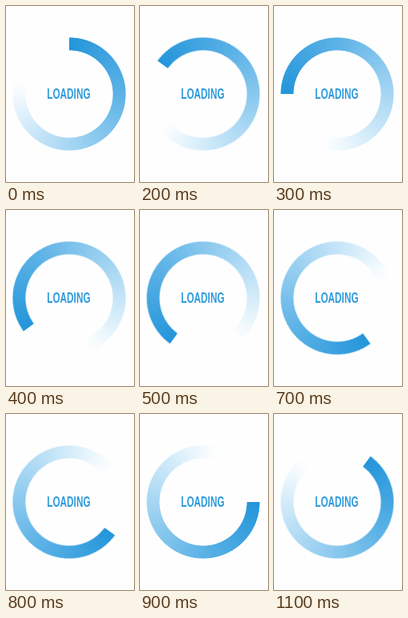
These frames come from a looping animation (160x220 px, 1200 ms). An HTML page:

```html
<!DOCTYPE html>
<html lang="en">
<head>
<meta charset="utf-8">
<title>Loading</title>
<style>
html, body {
  margin: 0;
  width: 100%;
  height: 100%;
  overflow: hidden;
  background: #fefefe;
}
.stage {
  position: relative;
  width: 160px;
  height: 220px;
}
.ring {
  --hole: radial-gradient(circle closest-side, transparent 54.2px, #000 55px, #000 70.2px, transparent 71px);
  position: absolute;
  left: 7.5px;
  top: 38.8px;
  width: 142px;
  height: 142px;
  background: conic-gradient(#2495da, #5cb2e6 90deg, #a6d6f3 180deg, #f3fafe 270deg, #fefefe 285deg);
  -webkit-mask: var(--hole);
  mask: var(--hole);
  animation: turn 1.2s step-end infinite;
}
svg {
  position: absolute;
  inset: 0;
}
text {
  font: bold 19px "Liberation Sans", Arial, sans-serif;
  fill: #2f9bdc;
  text-anchor: middle;
}
/* Twenty 18-degree positions, sampled at twelve even times */
@keyframes turn {
  0% { transform: rotate(0deg); }
  8.3333% { transform: rotate(-36deg); }
  16.6667% { transform: rotate(-54deg); }
  25% { transform: rotate(-90deg); }
  33.3333% { transform: rotate(-126deg); }
  41.6667% { transform: rotate(-144deg); }
  50% { transform: rotate(-180deg); }
  58.3333% { transform: rotate(-216deg); }
  66.6667% { transform: rotate(-234deg); }
  75% { transform: rotate(-270deg); }
  83.3333% { transform: rotate(-306deg); }
  91.6667% { transform: rotate(-324deg); }
  100% { transform: rotate(-360deg); }
}
</style>
</head>
<body>
<div class="stage">
  <div class="ring"></div>
  <svg width="160" height="220">
    <!-- condensed lettering -->
    <text transform="translate(78.4 116.4) scale(.62 1)">LOADING</text>
  </svg>
</div>
</body>
</html>
```
